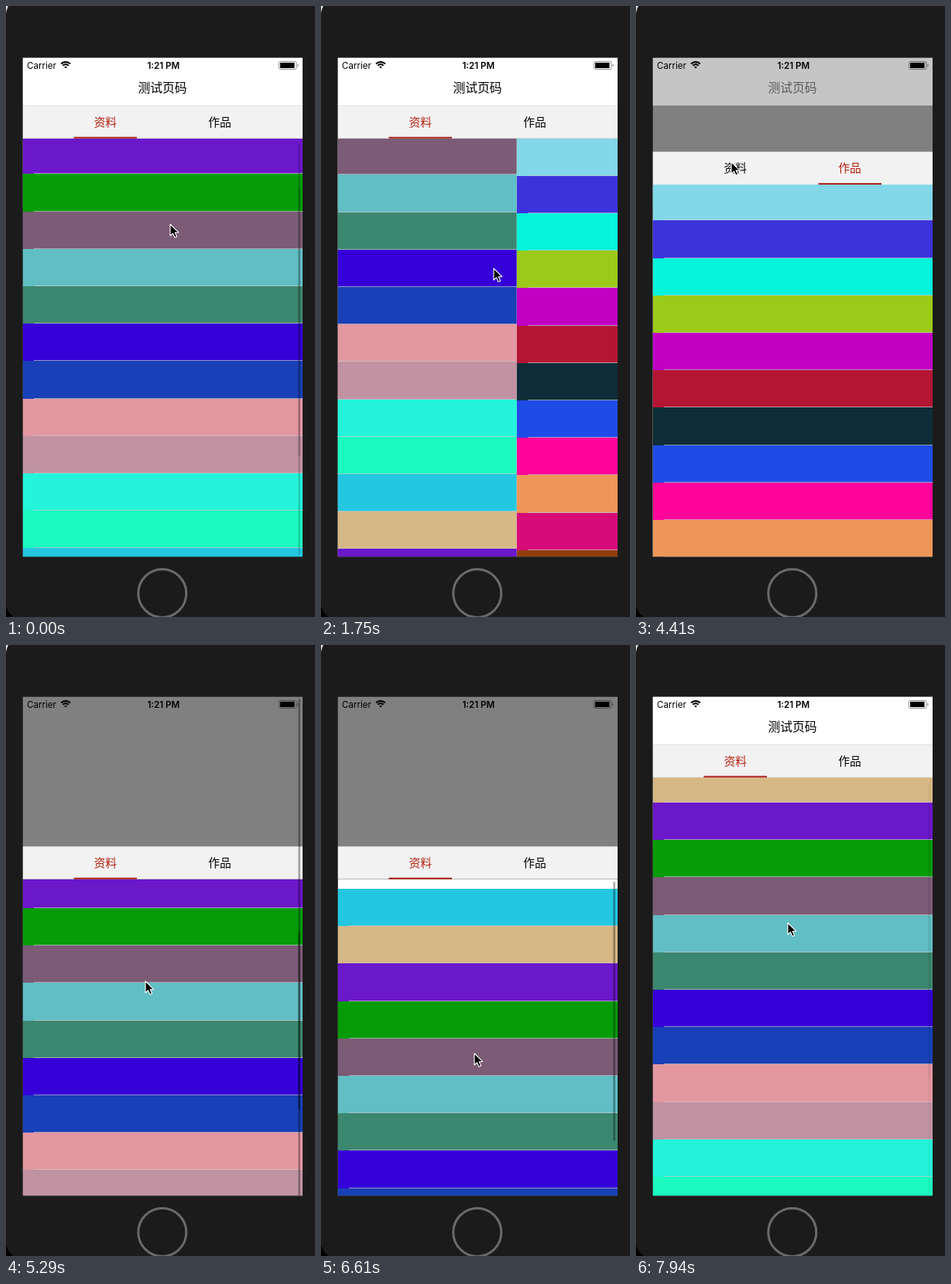
Animation, 399 px wide and 787 px high, one loop 8 s. Source, as an HTML page with a canvas:

```html
<!DOCTYPE html>
<html lang="zh">
<head>
<meta charset="utf-8">
<style>
  html, body { margin: 0; width: 100%; height: 100%; overflow: hidden; background: #1b1b1b; }
  canvas { display: block; }
</style>
</head>
<body>
<canvas id="stage" width="399" height="787"></canvas>
<script>
const ctx = document.getElementById('stage').getContext('2d');
const LOOP = 8000, STEP = 146.9;

// Layout follows a 375 x 667 pt phone screen.
const PT = 0.964;
const LEFT = 21.5, TOP = 66.5, WIDTH = 375 * PT, BOTTOM = TOP + 667 * PT;
const NAV_H = 64 * PT, HEADER_H = 200 * PT, TAB_H = 44 * PT, ROW_H = 50 * PT;
const TRAVEL = HEADER_H - NAV_H;
const ROWS = 18;
const CJK = '"Noto Sans CJK SC", "Noto Sans CJK", sans-serif';
const RED = '#b3200f';

const PROFILE_COLORS = ['#23c8e0', '#d6b786', '#6b17ca', '#059c08', '#7c5b76', '#61bec4', '#3c876f',
  '#3500d8', '#1841b7', '#e397a0', '#c192a2', '#24f5da', '#1cf9bf'];
const WORKS_COLORS = ['#82d7e9', '#3d33dc', '#06f3dc', '#9bca18', '#c000c2', '#b41533', '#0e2d38',
  '#1f4be8', '#ff049a', '#ed9658', '#d60b79', '#923d0e'];

// Where the pointer rests or turns: step, x, y.
const POINTER_STOPS = [[0, 212, 281], [5, 206, 334], [11, 290, 340], [15, 22, 332], [19, 22, 331],
  [23, 140, 360], [29, 123, 201], [31, 123, 201], [36, 180, 433], [45, 198, 526], [54, 196, 358]];

function stateAt(step) {
  const ramp = (from, to) => Math.min(1, Math.max(0, (step - from) / (to - from)));
  const easeOut = (from, to, power = 2) => 1 - (1 - ramp(from, to)) ** power;
  const shown = (from, to) => ramp(from, from + 1) * (1 - ramp(to, to + 2));

  const firstBars = (0.5 + 0.5 * ramp(0, 1)) * (1 - ramp(8, 10));
  const lastFade = 1 - 0.88 * ramp(51, 54);
  return {
    profileOffset: 98.9 + 95.3 * easeOut(0, 5) - 206.5 * easeOut(33, 45, 1.9) + 76.3 * easeOut(46, 53),
    worksOffset: 2 * ramp(20, 23),
    collapse: TRAVEL - 59.5 * ramp(20, 23) - (TRAVEL - 59.5) * ramp(33, 35) + TRAVEL * ramp(49, 51),
    page: easeOut(11, 16) - easeOut(30, 32),
    tab: ramp(14, 15) - ramp(30, 31),
    innerBar: firstBars + ramp(33, 34) * lastFade,
    outerBar: firstBars + shown(20, 23) + shown(33, 41) + ramp(49, 50) * lastFade,
    pointer: pointerAt(step)
  };
}

function pointerAt(step) {
  const i = POINTER_STOPS.findLastIndex(stop => stop[0] <= step);
  const [s0, x0, y0] = POINTER_STOPS[i];
  const [s1, x1, y1] = POINTER_STOPS[i + 1] || [s0 + 1, x0, y0];
  const k = (step - s0) / (s1 - s0);
  return [x0 + (x1 - x0) * k, y0 + (y1 - y0) * k];
}

function rect(x, y, w, h, color) {
  ctx.fillStyle = color;
  ctx.fillRect(x, y, w, h);
}

function circle(x, y, r, width, color, from = 0, to = 2 * Math.PI) {
  ctx.strokeStyle = color;
  ctx.lineWidth = width;
  ctx.beginPath();
  ctx.arc(x, y, r, from, to);
  ctx.stroke();
}

function text(str, x, y, font, color = '#000', align = 'center') {
  ctx.font = font;
  ctx.fillStyle = color;
  ctx.textAlign = align;
  ctx.fillText(str, x, y);
}

function clipped(x, y, w, h, draw) {
  ctx.save();
  ctx.beginPath();
  ctx.rect(x, y, w, h);
  ctx.clip();
  draw();
  ctx.restore();
}

function scrollBar(y, length, opacity) {
  ctx.fillStyle = `rgba(0,0,0,${0.35 * opacity})`;
  ctx.beginPath();
  ctx.roundRect(377.4, y, 2.5, length, 1.25);
  ctx.fill();
}

function drawList(colors, x, top, offset) {
  rect(x, top, WIDTH, BOTTOM - top, '#fff');
  for (let i = 0; i < ROWS; i++) {
    const y = Math.round(top + i * ROW_H - offset);
    rect(x, y, WIDTH, ROW_H + 1, colors[i % colors.length]);
    if (i) rect(x + 15 * PT, y - 1, WIDTH, 1, 'rgba(200,199,204,.7)');
  }
}

function drawPhone() {
  rect(0, 0, 399, 787, '#1b1b1b');
  ctx.fillStyle = '#ddd';
  ctx.fill(new Path2D('M0 0H3Q1 4 0 9'));
  ctx.fillStyle = '#000';
  ctx.fill(new Path2D('M0 773Q3 782 10 787H0'));
  circle(201.8, 756.5, 31, 3, '#6a6a6a');
}

function drawStatusBar() {
  text('Carrier', 27, 80.5, '11.6px Inter, sans-serif', '#000', 'left');
  text('1:21 PM', 203.3, 80.5, '600 11.6px Inter, sans-serif');
  for (const r of [1.5, 5.2, 8.4]) circle(77, 80.5, r, 2.1, '#000', -Math.PI * 0.75, -Math.PI * 0.25);
  ctx.strokeStyle = 'rgba(0,20,0,.45)';
  ctx.lineWidth = 1;
  ctx.beginPath();
  ctx.roundRect(352.5, 71.5, 22.5, 10, 2);
  ctx.stroke();
  rect(354, 73, 18.5, 7, '#000');
  rect(376.3, 75, 1.2, 3, 'rgba(0,20,0,.45)');
}

function drawTabs(y, tab) {
  rect(LEFT, y, WIDTH, TAB_H, '#f2f2f2');
  ['资料', '作品'].forEach((label, i) =>
    text(label, 128.3 + 147.7 * i, y + 26.6, `14.8px ${CJK}`, Math.round(tab) === i ? RED : '#000'));
  rect(87.5 + 148 * tab, y + TAB_H - 2, 81.5, 2, '#aa1d14');
}

function drawPointer([x, y]) {
  ctx.save();
  ctx.translate(x, y);
  const arrow = new Path2D('M0 0V15L3.4 11.8L6 17.3L8.6 16.1L6.2 10.8L10.8 10.6Z');
  ctx.fillStyle = '#000';
  ctx.strokeStyle = '#fff';
  ctx.lineWidth = 1.1;
  ctx.lineJoin = 'round';
  ctx.fill(arrow);
  ctx.stroke(arrow);
  ctx.restore();
}

function drawScreen(s) {
  const tabY = TOP + HEADER_H - s.collapse;
  const listTop = tabY + TAB_H;
  const navOpacity = s.collapse / TRAVEL;

  rect(LEFT, TOP, WIDTH, HEADER_H, '#808080');
  clipped(LEFT, listTop, WIDTH, BOTTOM - listTop, () => {
    const shift = s.page * WIDTH;
    drawList(PROFILE_COLORS, LEFT - shift, listTop, s.profileOffset);
    drawList(WORKS_COLORS, LEFT + WIDTH - shift, listTop, s.worksOffset);
    scrollBar(listTop + 3 + 0.603 * Math.max(0, s.profileOffset),
      346 + Math.min(0, s.profileOffset), s.innerBar);
  });
  drawTabs(tabY, s.tab);

  ctx.globalAlpha = navOpacity;
  rect(LEFT, TOP, WIDTH, NAV_H, '#fff');
  text('测试页码', 202, 111, `15.8px ${CJK}`);
  ctx.globalAlpha = 1;
  drawStatusBar();
  scrollBar(TOP + 3 + 108 * navOpacity, 529, s.outerBar);
}

function render(time) {
  const state = stateAt(Math.floor((time % LOOP + 12) / STEP));
  drawPhone();
  clipped(LEFT, TOP, WIDTH, BOTTOM - TOP, () => drawScreen(state));
  drawPointer(state.pointer);
}

const start = performance.now();
function tick() {
  render(performance.now() - start);
  requestAnimationFrame(tick);
}
tick();
</script>
</body>
</html>
```
